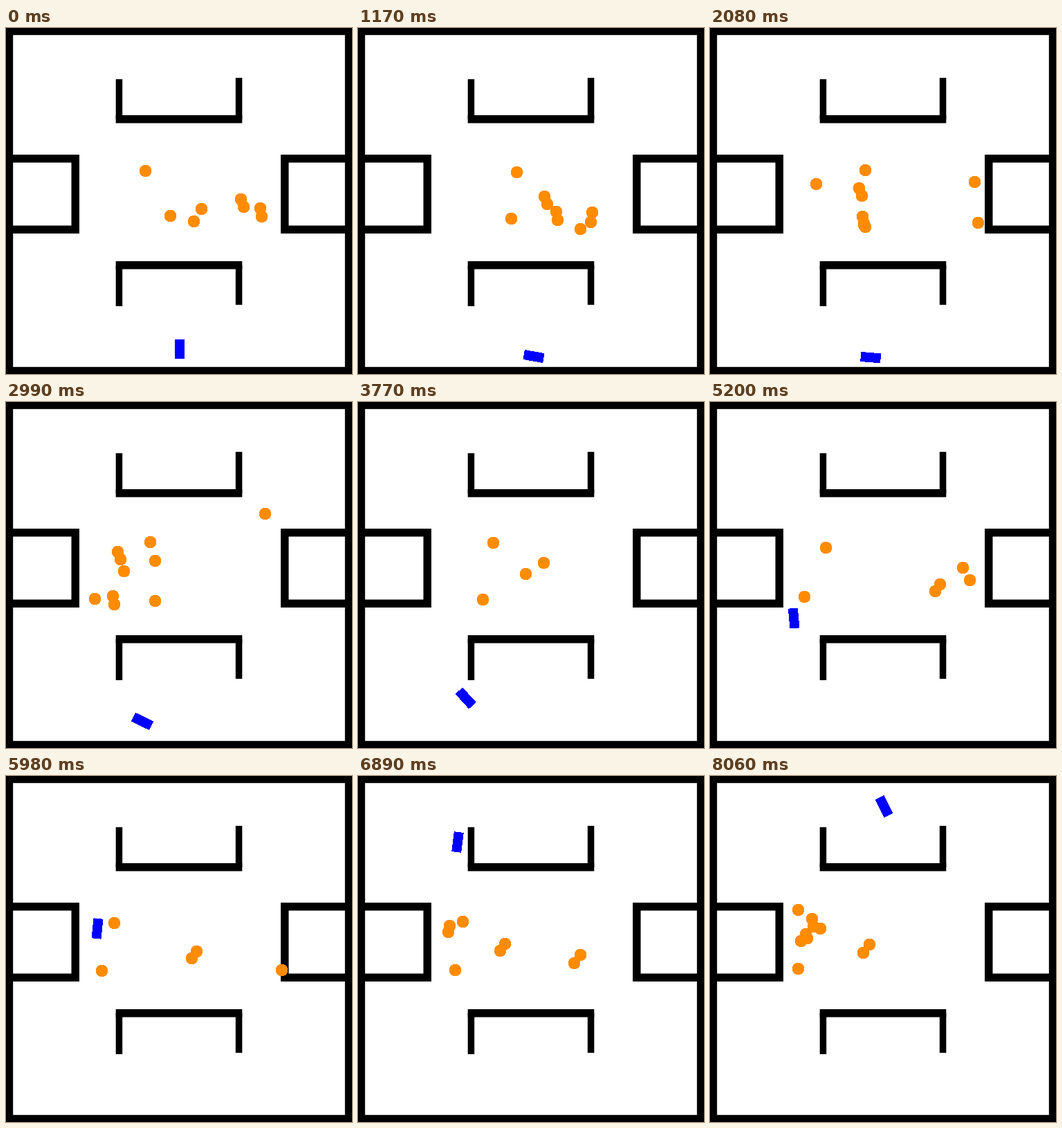
Animation of 500x500 px, one loop 8190 ms. Source, as a matplotlib script:

```python
import matplotlib.pyplot as plt
import numpy as np
from matplotlib.animation import FuncAnimation
from matplotlib.patches import Circle, Polygon, Rectangle

SIZE, FRAMES, INTERVAL = 500, 63, 130
RADIUS = 8
CAR_WIDTH, CAR_LENGTH = 13, 28
LEFT_GATE, RIGHT_GATE, TOP_GATE = 126, 401, 145
BAR, POST = 11.5, 9.5

# Each route: way points (frame, x, y), then the companion's offset if any.
# Walkers keep going straight past the last way point until they meet a gate.
ROUTES = [
    # lingering
    ([(0, 201, 206), (9, 229, 208), (23, 208, 202), (46, 156, 212), (62, 147, 206)], None),
    ([(0, 237, 271), (9, 221, 275), (23, 215, 287), (35, 145, 282),
      (53, 140, 280), (62, 127, 278)], None),
    # westbound
    ([(0, 339, 247), (9, 269, 243), (23, 161, 216)], (4, 11)),
    ([(0, 367, 260), (9, 286, 265), (23, 154, 280)], (2, 12)),
    ([(9, 321, 290), (23, 128, 284)], None),
    ([(35, 379, 271), (53, 212, 242), (62, 138, 228)], (-7, 10)),
    ([(47, 395, 267), (53, 321, 258), (62, 230, 243)], (-9, 12)),
    # eastbound
    ([(0, 271, 279), (9, 336, 280)], None),
    ([(0, 282, 261), (9, 338, 266), (16, 382, 222), (23, 374, 161)], None),
    ([(23, 215, 229), (35, 321, 236)], None),
    ([(23, 170, 244), (35, 315, 253)], None),
    ([(53, 132, 216), (62, 149, 217)], None),
    ([(53, 130, 225), (62, 159, 220)], None),
    ([(61, 122, 191), (62, 127, 193)], (13, 41)),
]

# (frame, x, y, degrees clockwise from up)
CAR_PATH = [
    (0, 251, 464, 0), (9, 254, 474.5, -80), (23, 197, 461.5, -64.4),
    (35, 122.5, 375, -19), (46, 132, 220.5, 6), (53, 144, 95.5, 7),
    (57, 153, 30, 35), (62, 251.5, 44, 153),
]


def glide(keys, t):
    """Cubic Hermite curve through the keys, continued straight at both ends."""
    keys = np.array(keys, float)
    times, points = keys[:, 0], keys[:, 1:]
    slopes = np.gradient(points, times, axis=0)
    if t <= times[0]:
        return points[0] + slopes[0] * (t - times[0])
    if t >= times[-1]:
        return points[-1] + slopes[-1] * (t - times[-1])
    i = np.searchsorted(times, t, side="right") - 1
    span = times[i + 1] - times[i]
    u = (t - times[i]) / span
    blend = u * u * (3 - 2 * u)
    return (points[i] * (1 - blend) + points[i + 1] * blend
            + span * u * (1 - u) * ((1 - u) * slopes[i] - u * slopes[i + 1]))


def walker_positions(t):
    for keys, offset in ROUTES:
        lead = np.round(glide(keys, t))
        yield lead
        if offset:
            yield lead + offset


def car_corners(t):
    x, y, heading = glide(CAR_PATH, t)
    angle = np.radians(heading)
    across = np.array([np.cos(angle), np.sin(angle)]) * CAR_WIDTH / 2
    along = np.array([np.sin(angle), -np.cos(angle)]) * CAR_LENGTH / 2
    return [np.array([x, y]) + a * across + b * along
            for a, b in ((-1, -1), (1, -1), (1, 1), (-1, 1))]


fig = plt.figure(figsize=(SIZE / 100, SIZE / 100), dpi=100, facecolor="white")
ax = fig.add_axes([0, 0, 1, 1])
ax.set(xlim=(0, SIZE), ylim=(SIZE, 0))
ax.axis("off")


def wall(left, top, right, bottom):
    ax.add_patch(Rectangle((left, top), right - left, bottom - top,
                           fc="black", lw=0, snap=False))


def draw_walls():
    edge = 10.2
    for near, far in ((0, edge), (SIZE - edge, SIZE)):
        wall(near, 0, far, SIZE)
        wall(0, near, SIZE, far)

    # side rooms
    top, bottom = 183, 297
    for outer, inner, front in ((0, 106, 106 - BAR), (SIZE, 397, 397 + BAR)):
        left, right = sorted((outer, inner))
        wall(left, top, right, top + BAR)
        wall(left, bottom - BAR, right, bottom)
        wall(min(inner, front), top, max(inner, front), bottom)

    # brackets opening towards the top and the bottom
    left, right = 158.7, 341.3
    for bar_top, left_end, right_end in ((126, 74, 72), (337, 402, 400)):
        wall(left, bar_top, right, bar_top + BAR)
        for x, end in ((left, left_end), (right - POST, right_end)):
            y0, y1 = sorted((bar_top + BAR / 2, end))
            wall(x, y0, x + POST, y1)


draw_walls()
walkers = [ax.add_patch(Circle((0, 0), RADIUS, fc="#ff8c00", lw=0, snap=False,
                               antialiased=False, zorder=2))
           for _ in walker_positions(0)]
car = ax.add_patch(Polygon(car_corners(0), fc="#0000ff", lw=0, snap=False,
                           antialiased=False, zorder=3))


def update(frame):
    for walker, (x, y) in zip(walkers, walker_positions(frame)):
        walker.center = x + 0.5, y + 0.5
        walker.set_visible(bool(LEFT_GATE <= x <= RIGHT_GATE and y > TOP_GATE))
    car.set_xy(car_corners(frame))
    return [*walkers, car]


animation = FuncAnimation(fig, update, frames=FRAMES, interval=INTERVAL,
                          repeat=True, repeat_delay=0)
plt.show()
```
